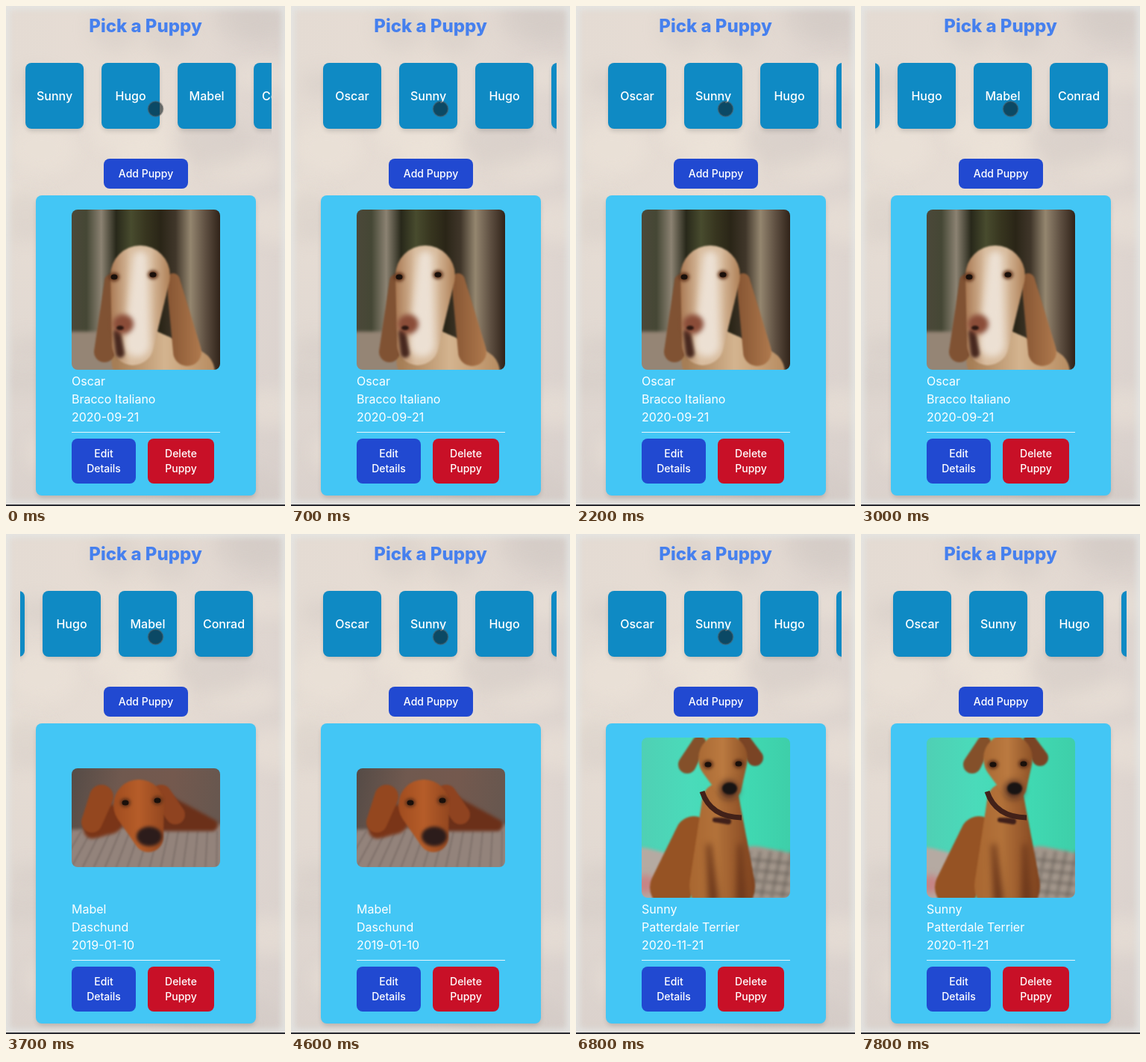
These frames come from a looping animation (374x668 px, 7900 ms). An HTML page with a canvas:

```html
<!DOCTYPE html>
<html lang="en">
<head>
<meta charset="utf-8">
<title>Pick a Puppy</title>
<style>
html, body { margin: 0; width: 100%; height: 100%; overflow: hidden; background: #e0d6d0; }
canvas { display: block; }
</style>
</head>
<body>
<canvas id="stage" width="374" height="668"></canvas>
<script>
const W = 374, H = 668, LOOP = 7900;
const BLUE = '#2149d1', RED = '#c81027', SKY = '#43c6f5', TILE = '#0f8ac4';
const ctx = document.getElementById('stage').getContext('2d');
const names = ['Oscar', 'Sunny', 'Hugo', 'Mabel', 'Conrad'];

// Swipes alternate between the two ends of the carousel
const swipes = [-172, 900, 1700, 2500, 4100], SWIPE = 400, REACH = 198;

function layer(w, h, paint) {
  const c = document.createElement('canvas');
  c.width = w;
  c.height = h;
  paint(c.getContext('2d'), w, h);
  return c;
}

function fade(g, x0, y0, x1, y1, ...colors) {
  const grad = g.createLinearGradient(x0, y0, x1, y1);
  colors.forEach((c, i) => grad.addColorStop(i / (colors.length - 1), c));
  return grad;
}

function seeded(seed) {
  return () => (seed = seed * 16807 % 2147483647) / 2147483647;
}

function oval(g, fill, x, y, rx, ry = rx, blur = 1) {
  g.filter = `blur(${blur}px)`;
  g.fillStyle = fill;
  g.beginPath();
  g.ellipse(x, y, rx, ry, 0, 0, Math.PI * 2);
  g.fill();
  g.filter = 'none';
}

// Rounded limb that narrows or widens from one end to the other
function limb(g, fill, [x0, y0, r0], [x1, y1, r1], blur = 1) {
  const n = 40;
  g.filter = `blur(${blur}px)`;
  g.fillStyle = fill;
  g.beginPath();
  for (let i = 0; i <= n; i++) {
    const k = i / n, x = x0 + (x1 - x0) * k, y = y0 + (y1 - y0) * k, r = r0 + (r1 - r0) * k;
    g.moveTo(x + r, y);
    g.arc(x, y, r, 0, Math.PI * 2);
  }
  g.fill();
  g.filter = 'none';
}

function eye(g, x, y) {
  oval(g, '#5c3019', x, y, 7, 6, 2);
  oval(g, '#1a100b', x, y, 4.5, 3.5, 0.6);
}

const backdrop = layer(W, H, g => {
  g.fillStyle = fade(g, 0, 0, W, 0, '#e4dbd3', '#e7ddd4', '#ddd4cf');
  g.fillRect(0, 0, W, H);
  g.fillStyle = fade(g, 0, 0, 0, H, '#d9d3d000', '#d9d3d000', '#d6cdc9b0');
  g.fillRect(0, 0, W, H);
  const rand = seeded(41);
  for (let i = 0; i < 24; i++) {
    oval(g, i % 2 ? '#d0c6c160' : '#efe5da70', rand() * W, rand() * H, 25 + rand() * 35, 15 + rand() * 25, 11);
  }
  // Pale blurred rim
  g.filter = 'blur(4px)';
  g.strokeStyle = '#e4e6e5';
  g.lineWidth = 8;
  g.strokeRect(0, 0, W, H - 2);
  g.filter = 'none';
  g.fillStyle = '#292a30';
  g.fillRect(0, H - 2, W, 2);
});

const hound = layer(199, 214, (g, w, h) => {
  g.fillStyle = fade(g, 0, 0, w, 0, '#4b4839', '#454735', '#8b8272', '#28281a', '#484b2e',
    '#37351f', '#2a2517', '#40362a', '#94866f', '#5f5042', '#302319');
  g.fillRect(0, 0, w, h);
  limb(g, '#958575', [0, 205, 42], [60, 205, 42], 2);
  limb(g, fade(g, 60, 0, 190, 0, '#a67e56', '#d4b48f', '#b88d62'), [95, 200, 42], [160, 218, 32]);
  limb(g, '#805233', [52, 95, 8], [44, 190, 14]);
  limb(g, fade(g, 132, 0, 175, 0, '#8a5835', '#b07a4e'), [136, 94, 9], [155, 190, 19]);
  limb(g, fade(g, 50, 0, 135, 0, '#a5734c', '#d9bd9f', '#d8bc9e', '#a9774c'), [92, 88, 40], [82, 180, 28]);
  limb(g, '#ece0d3', [92, 65, 10], [88, 180, 17], 5);
  limb(g, '#47281f', [61, 165, 5], [65, 192, 6], 2);
  oval(g, '#8a4c38', 69, 153, 14, 13, 3);
  oval(g, '#2c1712', 65, 158, 5, 3);
  eye(g, 109, 87);
  eye(g, 57, 90);
});

const napper = layer(199, 132, (g, w, h) => {
  g.fillStyle = fade(g, 0, 0, w, 40, '#554b46', '#70594f', '#74594e', '#67574f');
  g.fillRect(0, 0, w, h);
  limb(g, '#93837b', [0, 130, 48], [w, 130, 55], 2);
  g.filter = 'blur(1px)';
  g.strokeStyle = '#665a5670';
  g.lineWidth = 2;
  for (let x = 0; x < w + 40; x += 13) {
    g.beginPath();
    g.moveTo(x, 84);
    g.lineTo(x * 1.15 - 30, h);
    g.stroke();
  }
  limb(g, '#6b3019', [125, 60, 24], [188, 76, 8], 2);
  limb(g, '#7a3518', [50, 68, 20], [28, 82, 12], 2);
  limb(g, '#94471f', [40, 38, 16], [27, 72, 14]);
  limb(g, '#8f4320', [120, 36, 14], [139, 62, 13]);
  limb(g, fade(g, 50, 0, 130, 0, '#9c491d', '#b65d29', '#8d431e'), [90, 49, 34], [103, 92, 20]);
  oval(g, '#2c1c1b', 104, 91, 17, 13, 2);
  eye(g, 72, 46);
  eye(g, 115, 43);
});

const terrier = layer(199, 214, (g, w, h) => {
  g.fillStyle = fade(g, 0, 0, w, 0, '#4fd0b4', '#4adbba', '#40dab3', '#3ecfa9');
  g.fillRect(0, 0, w, h);
  limb(g, '#b5aaa2', [0, 185, 38], [20, 190, 38], 2);
  limb(g, '#a3978c', [150, 190, 45], [200, 200, 45], 2);
  g.filter = 'blur(2px)';
  g.strokeStyle = '#5c554f70';
  g.lineWidth = 4;
  for (let i = 0; i < 5; i++) {
    g.beginPath();
    g.moveTo(145 + i * 14, 152);
    g.lineTo(132 + i * 14, h);
    g.moveTo(140, 162 + i * 14);
    g.lineTo(w, 168 + i * 14);
    g.stroke();
  }
  oval(g, '#c68485', 5, 196, 14, 12, 5);
  limb(g, '#965324', [70, 130, 25], [40, 200, 29]);
  limb(g, fade(g, 50, 0, 150, 0, '#a4622d', '#b3723a', '#824520'), [106, 85, 25], [108, 198, 44]);
  limb(g, '#6e391c', [90, 145, 3], [96, 214, 7], 4);
  limb(g, '#6e391c', [132, 145, 3], [134, 214, 7], 4);
  limb(g, '#84502a', [77, 8, 10], [61, 36, 12]);
  limb(g, '#7a4425', [138, 5, 9], [152, 27, 11]);
  limb(g, fade(g, 75, 0, 142, 0, '#a96934', '#bb7a40', '#8e5227'), [109, 28, 33], [117, 66, 17]);
  oval(g, '#593321', 117, 70, 13, 13, 4);
  oval(g, '#181413', 118, 68, 10, 8);
  eye(g, 89, 36);
  eye(g, 130, 35);
  g.strokeStyle = '#422119';
  g.lineWidth = 7;
  g.beginPath();
  g.moveTo(81, 72);
  g.quadraticCurveTo(92, 106, 134, 107);
  g.stroke();
  limb(g, '#40201a', [98, 110, 3], [116, 112, 4]);
});

const puppies = [
  { from: 0, name: names[0], breed: 'Bracco Italiano', born: '2020-09-21', photo: hound },
  { from: 3500, name: names[3], breed: 'Daschund', born: '2019-01-10', photo: napper },
  { from: 5300, name: names[1], breed: 'Patterdale Terrier', born: '2020-11-21', photo: terrier }
];

function text(str, x, y, size, weight = 400, align = 'center', color = '#fff') {
  ctx.font = `${weight} ${size}px Inter, sans-serif`;
  ctx.textAlign = align;
  ctx.fillStyle = color;
  ctx.fillText(str, x, y);
}

function panel(x, y, w, h) {
  ctx.beginPath();
  ctx.roundRect(x, y, w, h, 8);
}

function box(x, y, w, h, color) {
  ctx.fillStyle = color;
  panel(x, y, w, h);
  ctx.fill();
}

function raised(x, y, w, h, color) {
  ctx.save();
  ctx.shadowColor = 'rgba(0,0,0,.15)';
  ctx.shadowBlur = 6;
  ctx.shadowOffsetY = 4;
  box(x + 1, y + 1, w - 2, h - 2, color);
  ctx.restore();
  box(x, y, w, h, color);
}

function button(label, x, y, w, h) {
  const lines = label.split('\n');
  box(x, y, w, h, label.startsWith('Delete') ? RED : BLUE);
  lines.forEach((s, i) => text(s, x + w / 2, y + h / 2 + 5 + (i - (lines.length - 1) / 2) * 20, 14, 500));
}

function scrollAt(t) {
  const i = swipes.findLastIndex(s => t >= s);
  const k = Math.min(1, (t - swipes[i]) / SWIPE);
  const ease = k * k * (3 - 2 * k);
  return REACH * (i % 2 ? ease : 1 - ease);
}

function drawCarousel(t) {
  const shift = scrollAt(t);
  ctx.save();
  ctx.beginPath();
  ctx.rect(19, 60, 337, 125);
  ctx.clip();
  names.forEach((name, i) => {
    const x = 43 + i * 102 - shift;
    raised(x, 76, 78, 88, TILE);
    text(name, x + 39, 126, 16, 500);
  });
  ctx.restore();
}

function drawCard(t) {
  const { name, breed, born, photo } = puppies.findLast(p => t >= p.from);
  const top = 379 - photo.height / 2;
  raised(40, 253, 295, 401, SKY);
  ctx.save();
  panel(88, top, photo.width, photo.height);
  ctx.clip();
  ctx.drawImage(photo, 88, top);
  ctx.restore();
  [name, breed, born].forEach((s, i) => text(s, 88, 507 + i * 24, 16, 400, 'left'));
  ctx.fillStyle = '#e4f5fc';
  ctx.fillRect(88, 569, 199, 1);
  button('Edit\nDetails', 88, 578, 86, 60);
  button('Delete\nPuppy', 190, 578, 89, 60);
}

function drawPointer() {
  ctx.beginPath();
  ctx.arc(200.5, 137.5, 10, 0, Math.PI * 2);
  ctx.fillStyle = 'rgba(8,24,30,.57)';
  ctx.fill();
  ctx.strokeStyle = 'rgba(90,90,90,.4)';
  ctx.lineWidth = 2;
  ctx.stroke();
}

function draw(t) {
  ctx.drawImage(backdrop, 0, 0);
  text('Pick a Puppy', 187, 35, 24, 800, 'center', '#4680ee');
  drawCarousel(t);
  button('Add Puppy', 131, 204, 113, 40);
  drawCard(t);
  if (t < 7000) drawPointer();
}

const began = performance.now();
function tick() {
  draw((performance.now() - began) % LOOP);
  requestAnimationFrame(tick);
}
tick();
</script>
</body>
</html>
```
